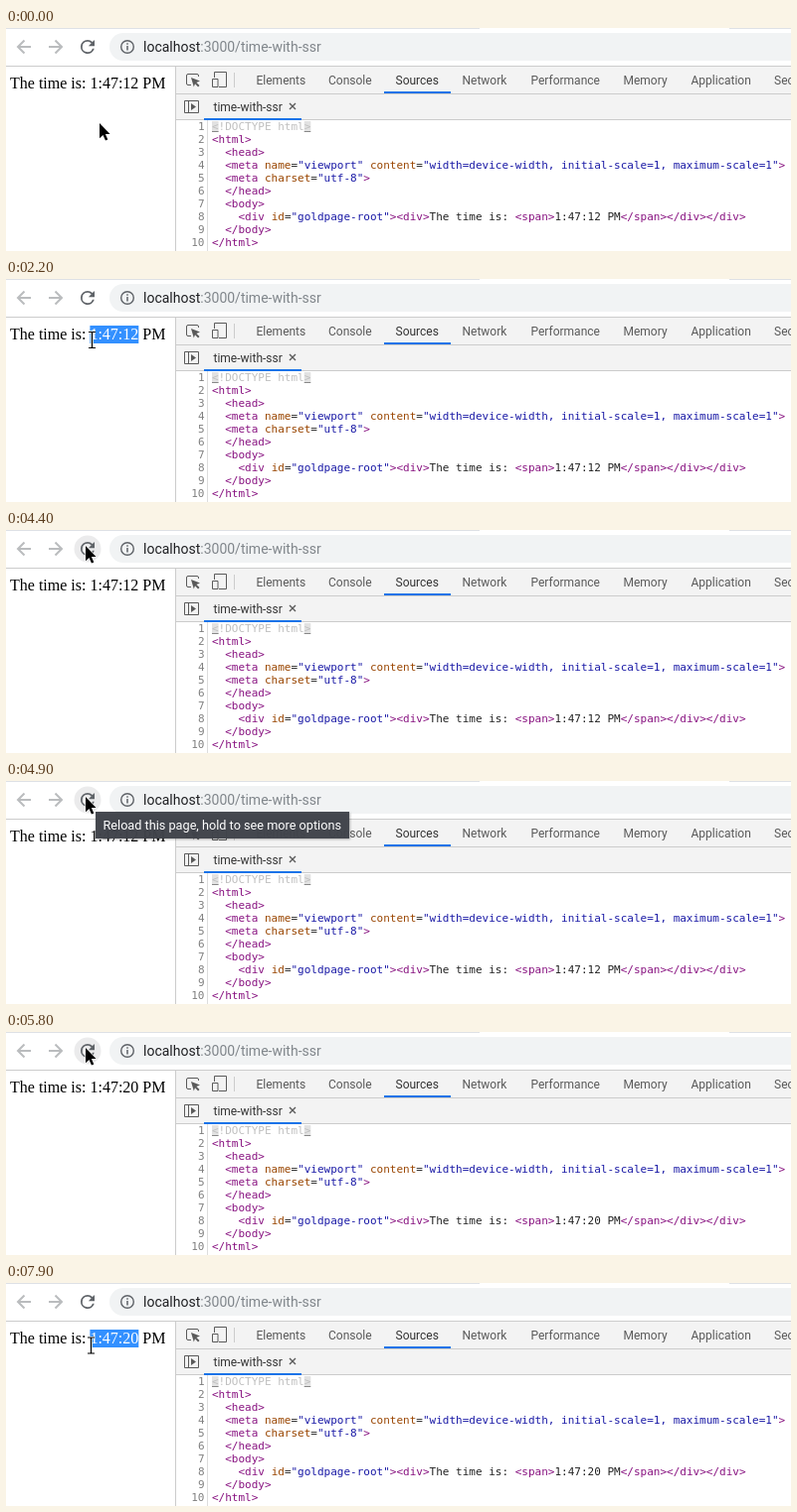
An HTML page that plays this animation: 789x225 px, repeating every 8000 ms.

```html
<!DOCTYPE html>
<html lang="en">
<head>
<meta charset="utf-8">
<title>Time with SSR</title>
<style>
  html, body { margin: 0; width: 100%; height: 100%; overflow: hidden; background: #fff; }
  svg { display: block; width: 789px; height: 225px; }
  text { white-space: pre; }
  .ui { font: 12px Roboto, sans-serif; fill: #5a5a5a; }
  .url { font-size: 14px; fill: #80868b; }
  .dark { fill: #202124; }
  .page { font: 16px "Liberation Serif", serif; fill: #000; }
  .code { font: 11px "DejaVu Sans Mono", monospace; fill: #222; }
  .num { fill: #808080; text-anchor: end; }
  .tag { fill: #881280; }
  .attr { fill: #994500; }
  .str { fill: #1a1aa6; }
  .doc { fill: #c0c0c0; }
  .line { fill: none; stroke: #5a5a5a; }
  .rule { fill: #ccc; }
  .blue { fill: #1a73e8; }
  #tip { filter: drop-shadow(1px 1px 1px rgba(0, 0, 0, .3)); }
</style>
</head>
<body>
<svg viewBox="0 0 789 225">
  <defs>
    <clipPath id="clip"><rect id="clipBox" y="47" height="18"/></clipPath>
  </defs>

  <!-- browser toolbar -->
  <path d="M0 0H476V1H0zM727 0H789V1H727z" fill="#dee1e6"/>
  <g fill="none" stroke="#babcbe" stroke-width="2">
    <path d="M25 19H12.500M18.500 12.500L12 19L18.500 25.500"/>
    <path d="M43 19H55.500M49.500 12.500L56 19L49.500 25.500"/>
  </g>
  <circle id="halo" cx="82" cy="19" r="13.5"/>
  <path id="reload" fill="#5f6368" transform="translate(71.5 8.500) scale(.875)"
    d="M17.650 6.350A7.960 7.960 0 0 0 12 4a8 8 0 1 0 7.730 10h-2.080A6 6 0 1 1 12 6c1.660 0 3.140.690 4.220 1.780L13 11h7V4z"/>
  <path id="stop" d="M76.500 13.500l11 11m0-11l-11 11" stroke="#5f6368" stroke-width="2"/>
  <rect x="104" y="5" width="720" height="28" rx="14" fill="#f1f3f4"/>
  <circle cx="122" cy="19" r="6.300" fill="none" stroke="#5f6368" stroke-width="1.400"/>
  <path d="M122 18v4.500M122 15.200v1.600" stroke="#5f6368" stroke-width="1.500"/>
  <text class="ui url" x="138" y="24"><tspan class="dark">localhost</tspan>:3000/time-with-ssr</text>
  <rect class="rule" y="38" width="789" height="1"/>

  <!-- page -->
  <text class="page" x="4" y="61">The time is: <tspan class="clock"></tspan> PM</text>
  <g id="selection">
    <rect id="mark" y="47" height="18" fill="#3390ff"/>
    <text class="page" x="84.400" y="61" clip-path="url(#clip)" style="fill:#fff"><tspan class="clock"></tspan></text>
  </g>

  <!-- developer tools -->
  <rect x="171" y="39" width="618" height="54" fill="#f3f3f3"/>
  <path class="rule" d="M170 39h1v186h-1zM171 66h618v1H171zM171 92h618v1H171zM229 45h1v15h-1z"/>
  <path class="line" d="M193.500 49V48Q193.500 46.500 192 46.500H183Q181.500 46.500 181.500 48V56Q181.500 57.500 183 57.500H186"/>
  <path d="M186 50l9 3.400l-3.600 1.500l3.100 3.100l-1.400 1.400l-3.100-3.100l-1.200 3.300z" fill="#5a5a5a"/>
  <path class="line" d="M209.500 50V44.500H221.500V59.500H214M207.500 51.500h5.500v8h-5.500z"/>
  <path class="line" d="M179.500 73.500h14v12h-14zM183.500 73.500v12"/>
  <path d="M186 76l5 3.500l-5 3.500z" fill="#5a5a5a"/>
  <g class="ui" id="tabs"></g>
  <rect class="blue" x="380" y="64" width="67" height="2"/>
  <text class="ui" x="208.500" y="84" style="fill:#333">time-with-ssr</text>
  <path d="M285 76l6 6m0-6l-6 6" stroke="#5a5a5a" stroke-width="1.400"/>
  <rect class="blue" x="199" y="91" width="98" height="2"/>
  <rect x="202" y="93" width="1" height="132" fill="#ddd"/>
  <path d="M207 94h6.600v10h-6.600zM299.700 94h6.600v10h-6.600z" fill="#e2e2e2"/>
  <path d="M207 104.500h6.600m86.100 0h6.600" stroke="#888"/>
  <g class="code" id="code"></g>

  <g id="tip">
    <rect x="90" y="31" width="255" height="27" fill="#40444b" fill-opacity=".97"/>
    <text class="ui" x="97.500" y="49" style="font-size:12.700px;fill:#fff">Reload this page, hold to see more options</text>
  </g>

  <path id="arrow" d="M0 0V15.200L3.500 12L6 17.600L8.300 16.600L5.900 11.100H10.600z"
    stroke="#fff" stroke-width="1.200" paint-order="stroke" stroke-linejoin="round"/>
  <g id="beam" fill="none">
    <path d="M-3.500-8H-1Q0-8 0-7Q0-8 1-8H3.500M0-7V7M-3.500 8H-1Q0 8 0 7Q0 8 1 8H3.500" stroke="#fff" stroke-width="2.600"/>
    <path d="M-3.500-8H-1Q0-8 0-7Q0-8 1-8H3.500M0-7V7M-3.500 8H-1Q0 8 0 7Q0 8 1 8H3.500" stroke="#000" stroke-width="1.200"/>
  </g>
</svg>
<script>
const $ = id => document.getElementById(id);
const LOOP = 8000, TICK = 100;

// Developer tools tabs
const tabs = { Elements: 251.5, Console: 324, Sources: 391.5, Network: 458.5,
  Performance: 527.5, Memory: 620.5, Application: 688.5, Security: 772 };
$('tabs').innerHTML = Object.entries(tabs).map(([name, x]) =>
  `<text x="${x}" y="57"${name === 'Sources' ? ' style="fill:#333"' : ''}>${name}</text>`).join('');

// Source listing with simple HTML highlighting
const listing = [
  '<!DOCTYPE html>',
  '<html>',
  '  <head>',
  '  <meta name="viewport" content="width=device-width, initial-scale=1, maximum-scale=1">',
  '  <meta charset="utf-8">',
  '  </head>',
  '  <body>',
  '    <div id="goldpage-root"><div>The time is: <span>@ PM</span></div></div>',
  '  </body>',
  '</html>'
];
const span = (cls, s) => `<tspan class="${cls}">${s.replace(/</g, '&lt;').replace(/>/g, '&gt;')}</tspan>`;
const paint = line => line.replace(/<!.*>|<\/?\w+>?|[\w-]+(?==")|"[^"]*"|>|@/g, s =>
  s === '@' ? span('clock', '') :
  s[0] === '"' ? span('str', s) :
  s.startsWith('<!') ? span('doc', s) :
  /[<>]/.test(s) ? span('tag', s) : span('attr', s));
$('code').innerHTML = listing.map((line, i) => {
  const y = 103 + 13 * i;
  return `<text class="num" x="199.500" y="${y}">${i + 1}</text><text x="207" y="${y}">${paint(line)}</text>`;
}).join('');
const clocks = document.querySelectorAll('.clock');

// Pointer moves: first tick, last tick, x, y
const start = [94, 96];
const moves = [
  [700, 1200, 137.5, 62.5],
  [1500, 1600, 137.5, 61.5],
  [2000, 2200, 86.5, 61.5],
  [3100, 3200, 87, 82],
  [3800, 4400, 80, 16],
  [6300, 7100, 133, 53.5],
  [7200, 7200, 133, 54.5],
  [7400, 7700, 85.5, 62],
  [7900, 7900, 85.5, 63]
];
const clamp = v => Math.min(1, Math.max(0, v));
const ease = p => p * p * (3 - 2 * p);

function pointer(t) {
  let [x, y] = start;
  for (const [from, to, nx, ny] of moves) {
    const p = ease(clamp((t - from + TICK) / (to - from + TICK)));
    x += (nx - x) * p;
    y += (ny - y) * p;
  }
  return [x, y];
}

// Character edges of the clock text
const edges = [84.4, 92.4, 96.9, 104.9, 112.9, 117.3, 125.3, 133.3];
const nearest = x => edges.reduce((a, b) => Math.abs(b - x) < Math.abs(a - x) ? b : a);
const show = (id, on) => $(id).style.display = on ? '' : 'none';

function draw(t) {
  const [x, y] = pointer(t);
  const overText = x < 165 && y > 45 && y < 67;
  show('arrow', !overText);
  show('beam', overText);
  $('arrow').setAttribute('transform', `translate(${x} ${y})`);
  $('beam').setAttribute('transform', `translate(${x} ${y})`);

  const time = t < 5800 ? '1:47:12' : '1:47:20';
  clocks.forEach(c => { if (c.textContent !== time) c.textContent = time; });

  const selected = t >= 2000 && t < 3200 || t >= 7400;
  show('selection', selected);
  if (selected) {
    const left = t >= 3100 && t < 3200 ? edges[0] : nearest(x);
    for (const id of ['mark', 'clipBox']) {
      $(id).setAttribute('x', left);
      $(id).setAttribute('width', edges[7] - left);
    }
  }

  const loading = t >= 5500 && t < 5800;
  show('reload', !loading);
  show('stop', loading);
  show('halo', Math.hypot(x - 82, y - 19) < 14);
  $('halo').setAttribute('fill', t >= 5300 && t < 5500 ? '#d8d9da' : '#ebebec');

  $('tip').style.opacity = Math.min(clamp((t - 4600) / 300), clamp((5500 - t) / 300));
}

function frame(now) {
  draw(Math.floor(now % LOOP / TICK) * TICK);
  requestAnimationFrame(frame);
}
draw(0);
requestAnimationFrame(frame);
</script>
</body>
</html>
```
